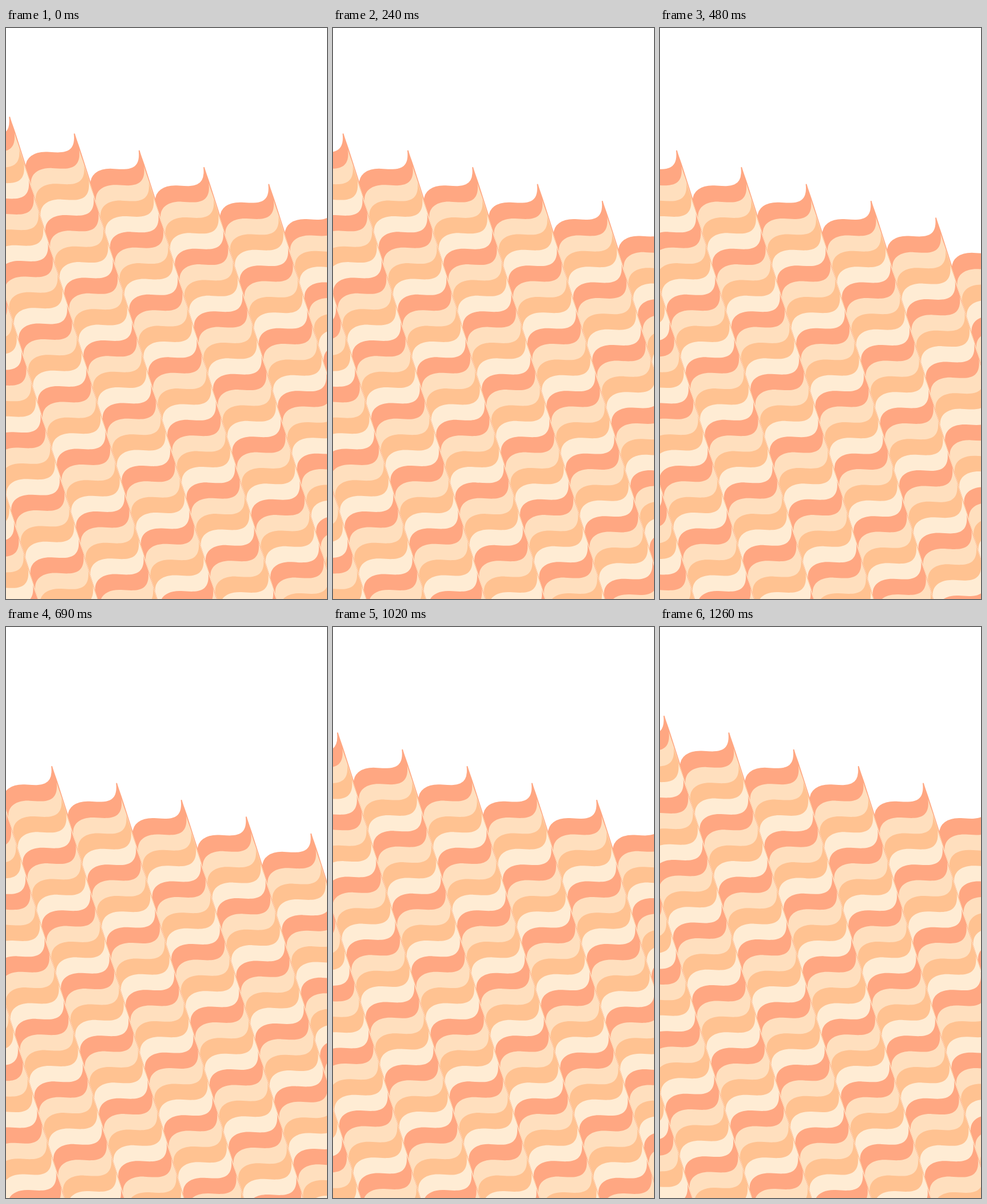
Recreate the animation shown at these times as an HTML page. Size 561 by 998 pixels, loop 1.29 s.

```html
<!DOCTYPE html>
<html lang="en">
<head>
<meta charset="utf-8">
<title>Waves</title>
<style>
html, body { margin: 0; width: 100%; height: 100%; overflow: hidden; background: #fff; }
svg { display: block; width: 561px; height: 998px; }
#sea path:first-child { stroke: #ffa782; stroke-width: 2; stroke-linejoin: round; }
</style>
</head>
<body>
<svg viewBox="0 0 561 998"><g id="sea"></g></svg>
<script>
const NS = "http://www.w3.org/2000/svg";
const COLORS = ["#ffa782", "#ffdfbe", "#ffc291", "#ffecd4"];
const CREST = { x: 113.25, y: 29.4 };   // from one crest to the next
const LAYER = { x: 8.35, y: 27.375 };   // from one layer to the next
const LAYERS = 38, FIRST = -6, LAST = 10;
const STEP = 30, LOOP = 1290;
const sea = document.getElementById("sea");

// Points are relative to the crest at the end of each wave.
const START = [-83.8, 61.6];
const CURVES = [
  [-85.5, 43, -70, 32.5, -47, 33.5],
  [-23, 35, 4.5, 39, 0.3, 1.3],
  [2.6, 10, 6.4, 19, 9.7, 29.5]
];

function wavePath() {
  let d = "";
  for (let i = FIRST; i <= LAST; i++) {
    const at = p => p.map((v, k) => (v + i * (k % 2 ? CREST.y : CREST.x)).toFixed(2)).join(" ");
    d += (d ? "L" : "M") + at(START);
    for (const c of CURVES) d += "C" + at(c);
  }
  return d + "V1500H" + (FIRST * CREST.x + START[0]) + "Z";
}

const d = wavePath();
for (let n = 0; n < LAYERS; n++) {
  const path = document.createElementNS(NS, "path");
  path.setAttribute("d", d);
  path.setAttribute("fill", COLORS[n % 4]);
  path.setAttribute("transform", `translate(${n * LAYER.x} ${n * LAYER.y})`);
  sea.appendChild(path);
}

// Slides left at an even pace, then returns a little faster.
function offset(t) {
  const k = Math.floor((t % LOOP) / STEP);
  return k <= 22 ? 6 - 12.73 * k : 6.8 - 14.04 * (42 - k);
}

function draw() {
  sea.setAttribute("transform", `translate(${offset(performance.now()).toFixed(2)} 154.6)`);
  requestAnimationFrame(draw);
}
draw();
</script>
</body>
</html>
```
